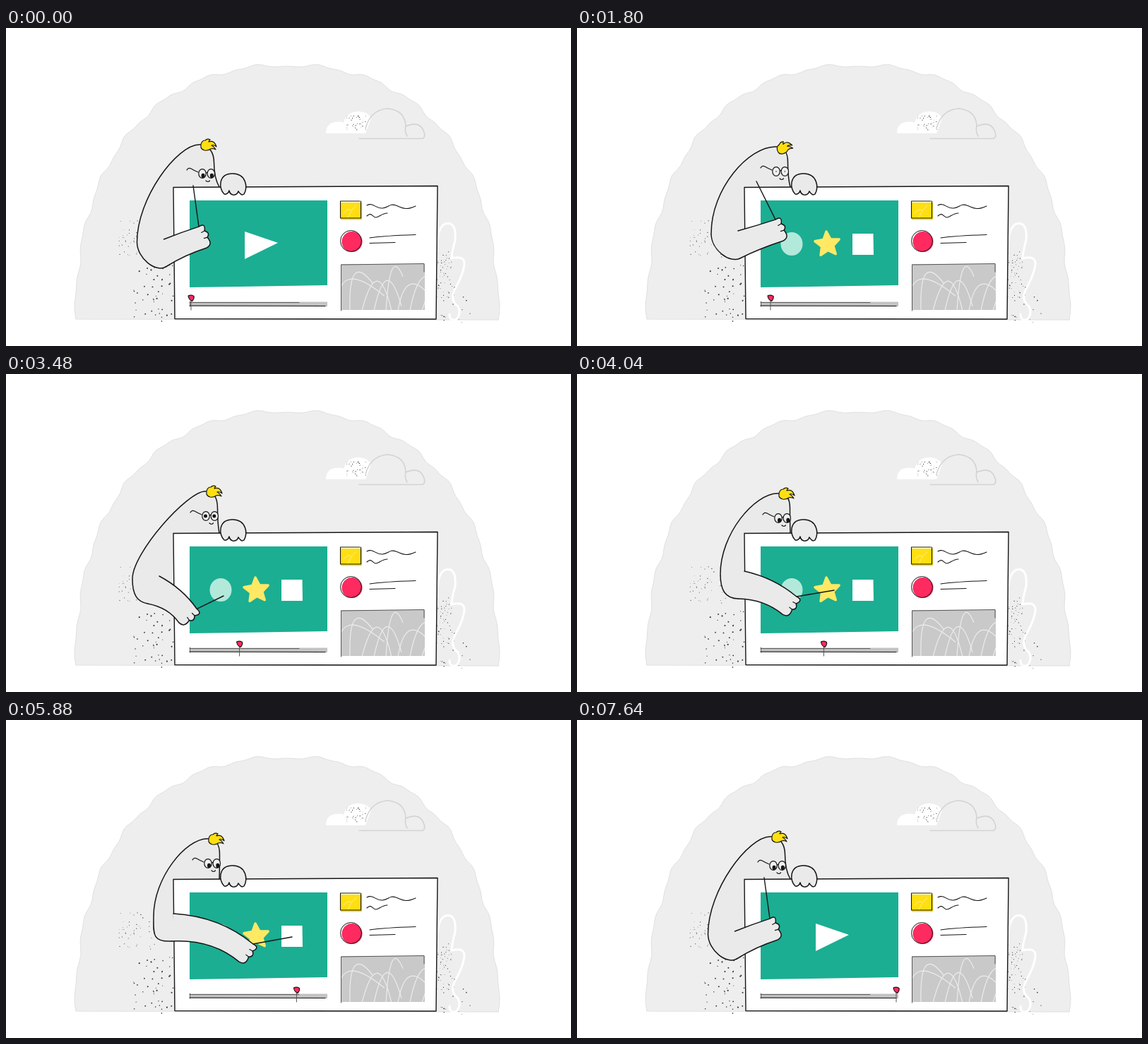
Animation, 800 px wide and 450 px high, one loop 7960 ms. Source, as an HTML page with a canvas:

```html
<!DOCTYPE html>
<html lang="en">
<head>
<meta charset="utf-8">
<title>Presenter</title>
<style>
html, body { margin: 0; width: 100%; height: 100%; overflow: hidden; background: #fff; }
canvas { display: block; }
</style>
</head>
<body>
<canvas id="stage" width="800" height="450"></canvas>
<script>
const ctx = document.getElementById('stage').getContext('2d');
const LOOP = 7960, STEP = 40;
const INK = '#161616', SKIN = '#eaeaea', PINK = '#ff2a5f', YELLOW = '#ffdf12';

// back: leftmost point of the body, bow: roundness of the spine,
// turn: direction of the hand, tip: end of the stick, nod: how far the face sinks
const rest = {
  hair: [287, 166], tilt: 0, nod: 6, look: [1, 3], eye: 3.2,
  back: [185.5, 303], bow: .45, hand: [276, 297], turn: -.31, tip: [265, 223]
};
const pose = (changes, from = rest) => ({ ...from, ...changes });
const restTap = pose({ tip: [340, 302], look: [2.5, 3] });
const alert = pose({ hair: [289, 161], tilt: -.4 });
const look = pose({ hair: [294, 169], tilt: -.45, nod: 0, look: [0, 0], eye: .8,
  back: [190, 291], bow: .52, hand: [284, 287], tip: [254, 217] });
const circle = pose({ hair: [295, 167], nod: 0, look: [-.5, 0], eye: 2.5,
  back: [179, 290], bow: .3, hand: [256, 340], turn: .96, tip: [308, 314] });
const star = pose({ hair: [297, 170], nod: 0, look: [1.5, 3],
  back: [203, 283], bow: .5, hand: [299, 326], turn: .7, tip: [364, 306] });
const reach = pose({ hair: [298, 169], back: [209, 278], hand: [326, 328], tip: [338, 322] }, star);
const square = pose({ hand: [338, 328], tip: [405, 307] }, reach);
const watch = pose({ hair: [294, 168], tilt: -.4, back: [199, 280],
  hand: [294, 295], turn: -.1, tip: [289, 223] }, star);
const watchTap = pose({ tip: [354, 302] }, watch);

// [arrive, leave, pose]
const acts = [
  [0, 180, rest], [240, 400, restTap], [480, 820, rest], [1040, 1220, alert], [1640, 2080, look],
  [2520, 3560, circle], [3920, 4560, star], [5040, 5040, reach], [5320, 5920, square],
  [6360, 7000, watch], [7240, 7460, watchTap], [7620, LOOP, rest]];

const ramp = (t, from, to) => Math.min(1, Math.max(0, (t - from) / (to - from)));
const ease = u => u * u * (3 - 2 * u);
const mix = (a, b, u) => Array.isArray(a) ? a.map((v, i) => mix(v, b[i], u)) : a + (b - a) * u;

function poseAt(t) {
  const i = acts.findIndex(act => act[1] > t), [arrive, , to] = acts[i];
  if (t >= arrive) return to;
  const [, leave, from] = acts[i - 1], u = ease(ramp(t, leave, arrive)), now = {};
  for (const part in from) now[part] = mix(from[part], to[part], u);
  return now;
}

function paint(path, fill, stroke, width = 1.4) {
  const p = typeof path == 'string' ? new Path2D(path) : path;
  if (fill) { ctx.fillStyle = fill; ctx.fill(p); }
  if (stroke) { ctx.strokeStyle = stroke; ctx.lineWidth = width; ctx.stroke(p); }
}

function ellipse(x, y, rx, ry, fill, stroke, width) {
  const p = new Path2D();
  p.ellipse(x, y, rx, ry, 0, 0, Math.PI * 2);
  paint(p, fill, stroke, width);
}

function at(x, y, scale, draw, turn = 0) {
  if (scale <= 0) return;
  ctx.save();
  ctx.translate(x, y);
  ctx.rotate(turn);
  ctx.scale(scale, scale);
  draw();
  ctx.restore();
}

let seed;
const random = (from, to) => from + (to - from) * (seed = seed * 16807 % 2147483647) / 2147483647;
function speckle(count, x, y, w, h, size) {
  while (count--) {
    const r = size * random(.5, 1.1);
    ellipse(random(x, x + w), random(y, y + h), r, r, '#333');
  }
}

function hill() {
  const path = new Path2D(), bend = v => Math.sign(v) * Math.abs(v) ** .87;
  for (let a = 0; a <= Math.PI; a += .02) {
    const r = 1 + .006 * Math.sin(a * 27) + .003 * Math.sin(a * 61);
    path.lineTo(398 + 299 * r * bend(Math.cos(a)), 413 - 360 * r * bend(Math.sin(a)));
  }
  path.closePath();
  paint(path, '#eeeeee', '#e0e0e0', 1);
}

function scenery() {
  seed = 77;
  hill();
  paint('M453 149Q453 135 466 133Q474 132 478 134Q482 118 500 118Q513 119 517 128L509 149Z', '#fff');
  speckle(45, 482, 124, 28, 20, .55);
  paint('M509 142Q516 116 540 114Q565 116 566 139Q585 131 591 145Q595 154 590 156.5H500M566 138Q564 146 568 153',
    null, '#d3d3d3', 1.6);
  speckle(45, 160, 270, 52, 54, .6);
  speckle(45, 180, 335, 58, 80, 1);
  speckle(50, 610, 312, 22, 70, .6);
  speckle(20, 608, 365, 50, 52, .8);
  paint('M612 300Q612 282 622 277Q638 273 636 300Q631 318 631 326Q650 321 649 335Q647 349 637 367Q627 384 640 394Q645 404 638 412Q628 416 628 405',
    null, '#fff', 3);
}

function thumbnail() {
  const box = new Path2D('M474 334H593V399H474Z');
  paint(box, '#c9c9c9');
  ctx.save();
  ctx.clip(box);
  for (let x = 470; x < 590; x += 17)
    paint(`M${x} 400Q${x + random(-10, 40)} ${random(300, 350)} ${x + random(20, 70)} ${random(350, 400)}`,
      null, '#ececec', 1.2);
  ctx.restore();
  paint('M474.5 400V335L592 333.5V345', null, '#555', 1);
}

function board() {
  paint('M237 225.5L611 223.5L609 412L239 411.5Z', '#fff', INK, 1.4);
  paint('M260 244H455V364L330 366L260 367Z', '#1bae93');
  paint('M474 247H504V271.5H474Z', YELLOW);
  paint('M478 262Q485 254 489 258M484 269Q490 254 496 252', null, '#ffee8a', 1);
  paint('M473.5 245V269H502.5V245M474 245H501', null, INK, 1.1);
  ellipse(490, 302.5, 14.5, 14.5, PINK);
  ellipse(488.5, 301.5, 15, 15, null, INK, 1);
  paint('M511 251C519 246 524 256 533 255S543 248 552 251S565 259 580 252M511 266C517 260 519 267 523 268S532 262 540 262M515 297Q535 294 580 292.5M515 304.5L551 303.5',
    null, INK, 1.1);
  thumbnail();
  paint('M260 387.5H455V394H260Z', '#c2c2c2');
  paint('M260 388.5H415M260.5 387V394', null, '#444', .8);
  paint('M260 393L452 393.5', null, INK, 1.2);
}

function starShape() {
  const path = new Path2D();
  for (let i = 0; i < 10; i++) {
    const a = i * Math.PI / 5 - Math.PI / 2 - .08, r = i % 2 ? 8.5 : 18;
    path.lineTo(r * Math.cos(a), r * Math.sin(a));
  }
  path.closePath();
  paint(path, '#ffe964', '#ffe964', 3.5);
}

function screen(t) {
  const pop = delay => ease(ramp(t, 1280 + delay, 1480 + delay)) * (1 - ramp(t, 6960, 7080));
  const play = 1 - ramp(t, 1220, 1340) + ease(ramp(t, 7080, 7200));
  at(361, 307, play, () => paint('M-23 -19L24 -3L-23 20Z', '#fff'));
  at(304, 305.5, pop(0), () => ellipse(0, 0, 15.5, 16.5, '#b3e9da'));
  at(354.5, 306, pop(80), starShape);
  at(405, 306, pop(160), () => paint('M-15 -15H14.5L15 15H-15Z', '#fff'));
  at(mix(262, 452, ramp(t, 1444, 7085)), 382, 1, () => {
    paint('M0 4V17', null, '#555', 1);
    paint('M-4 -3Q0 -5 4 -2.5Q5 1 1.5 4.5Q-3 3 -4 -3Z', PINK, INK, 1.2);
  });
}

// Points shared by body and arm, all derived from the pose
function joints({ hair, nod, back, hand, turn }) {
  const cos = Math.cos(turn), sin = Math.sin(turn);
  const onHand = (x, y) => [hand[0] + x * cos - y * sin, hand[1] + x * sin + y * cos];
  const behind = (p, q) => {
    const d = Math.hypot(p[0] - q[0], p[1] - q[1]) / 2;
    return [p[0] - d * cos, p[1] - d * sin];
  };
  const pit = [Math.min(237, back[0] + 38), back[1] - 4];
  const base = [back[0] + 36 - 15 * turn, back[1] + 35];
  const top = onHand(2, -16), heel = onHand(3, 16);
  return { onHand, pit, base, top, heel, upper: behind(top, pit), lower: behind(heel, base),
    face: [hair[0] - 12 + nod / 2, hair[1] + 34 + nod], crown: [hair[0] - 13, hair[1] - 1] };
}

function body({ back, bow }, { face, crown, base, lower, pit }) {
  const front = face[0] + 16.5, [bx, by] = back, [cx, cy] = crown;
  const outline = new Path2D(`M302 225Q${front} 212 ${front} 190C${front} 176 ${cx + 13} ${cy} ${cx} ${cy}
    C${cx - bow * (cx - bx) * .8} ${cy} ${bx} ${by - bow * (by - cy)} ${bx} ${by}
    C${bx} ${by + 23} ${mix(lower, base, 1.5)} ${base}`);
  const inside = new Path2D(outline);
  inside.lineTo(245, pit[1] + 10);
  inside.lineTo(302, 228);
  paint(inside, SKIN);
  paint(outline, null, INK, 1.5);
}

function head({ hair, tilt, look, eye }, { face }) {
  at(...face, 1, () => {
    paint('M-22 -5Q-20 -9 -16 -7Q-11 -4 -6 -2M5.5 -1Q6.5 -2 7.5 -1M5 10Q8 13 10.5 10', null, INK, 1.2);
    for (const x of [0, 12.3]) {
      ellipse(x, 0, 5.2, 6.4, '#f0f0f0', INK, 1.2);
      ellipse(x + look[0], look[1], Math.min(2.5, eye), eye, INK);
    }
  });
  at(...hair, 1, () => paint(
    'M-11 3C-12 -3 -9 -7 -5 -7Q-2 -10 2 -8Q0 -6 0 -5Q8 -8 11 2Q8 -1 4 0Q8 2 10 6Q6 4 3 5Q-1 8 -6 7Q-10 6 -11 3Z',
    YELLOW, INK, 1.2), tilt);
}

function arm({ tip }, { onHand, pit, base, top, heel, upper, lower }) {
  paint(`M${top}L${tip}`, null, INK, 1.4);
  const gaps = [onHand(8, -8), onHand(9, 2)];
  paint(`M${pit}Q${upper} ${top}Q${onHand(13, -19)} ${gaps[0]}Q${onHand(15, -3)} ${gaps[1]}
    Q${onHand(14, 14)} ${heel}Q${lower} ${base}`, SKIN, INK, 1.5);
  paint(`M${gaps[0]}L${onHand(3, -7)}M${gaps[1]}L${onHand(4, 2)}`, null, INK, 1.2);
}

function frame(now) {
  const t = Math.floor(now % LOOP / STEP) * STEP, p = poseAt(t), j = joints(p);
  ctx.fillStyle = '#fff';
  ctx.fillRect(0, 0, 800, 450);
  ctx.lineCap = ctx.lineJoin = 'round';
  scenery();
  body(p, j);
  head(p, j);
  board();
  screen(t);
  arm(p, j);
  paint('M309 235C301 228 300 206 321 206C340 206 343 226 337 235Q333 238 329 231Q327 237 321 236Q317 235 316 230Q314 236 309 235Z',
    SKIN, INK, 1.5);
  requestAnimationFrame(frame);
}
requestAnimationFrame(frame);
</script>
</body>
</html>
```
